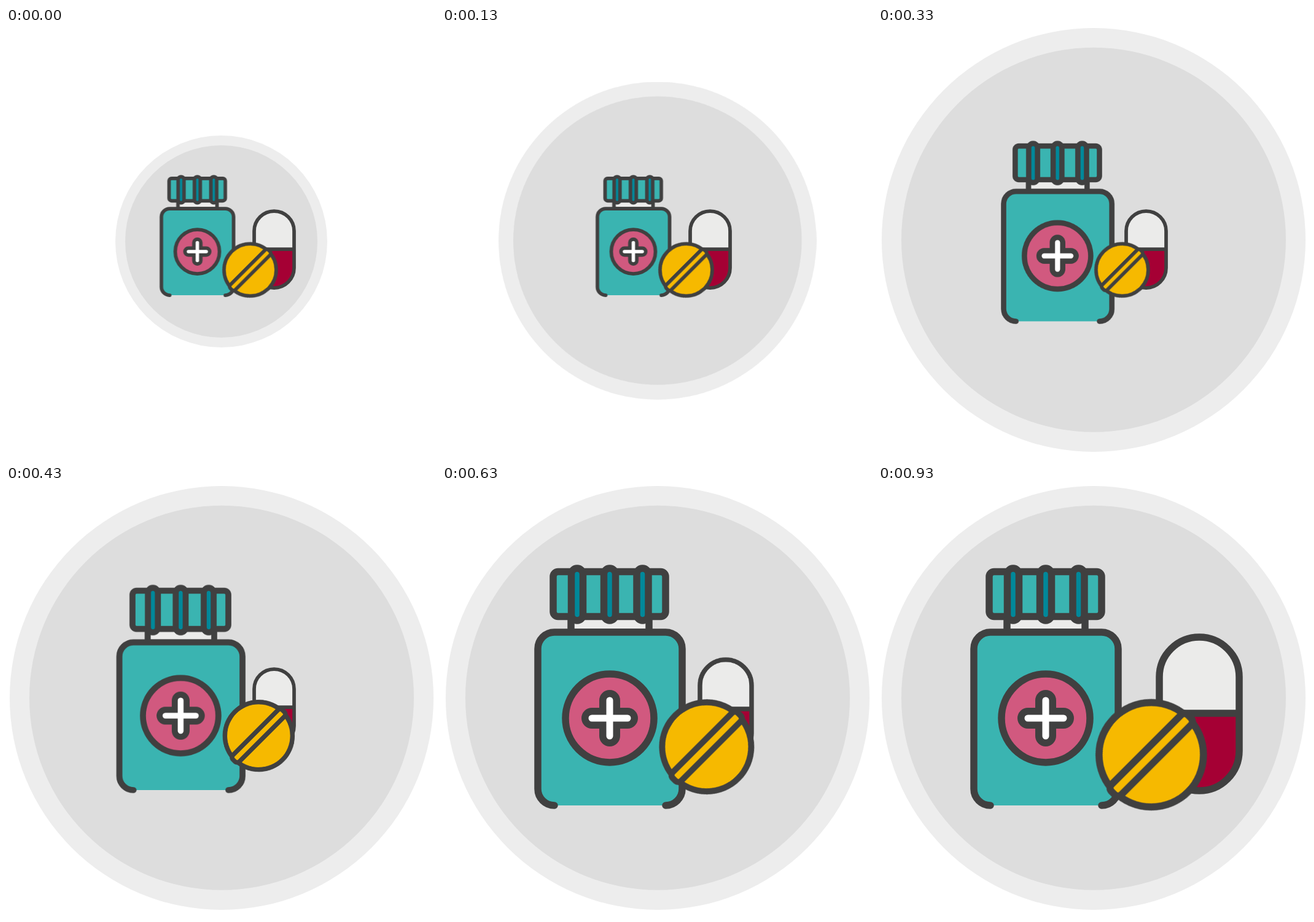
These frames come from a looping animation (700 by 700 pixels, 8000 ms). An HTML page:

```html
<!DOCTYPE html>
<html lang="en">
<head>
<meta charset="utf-8">
<title>Medicine icon</title>
<style>
  html, body { margin: 0; width: 100%; height: 100%; overflow: hidden; background: #fff; }
  svg { display: block; width: 100%; height: 100%; }

  .part { transform-origin: 350px 350px; animation: 8s step-end infinite; }
  .plate { animation-name: plate; }
  .capsule { animation-name: capsule; }
  .bottle { animation-name: bottle; }
  .tablet { animation-name: tablet; }

  /* Each part doubles in four hard steps, one part after another. */
  @keyframes plate {
    0% { transform: scale(.5); }
    .375% { transform: scale(.647); }
    1.625% { transform: scale(.75); }
    2.875% { transform: scale(.853); }
    4.125%, 100% { transform: scale(1); }
  }
  @keyframes bottle {
    0% { transform: scale(.5); }
    2.875% { transform: scale(.647); }
    4.125% { transform: scale(.75); }
    5.375% { transform: scale(.853); }
    6.625%, 100% { transform: scale(1); }
  }
  @keyframes tablet {
    0% { transform: scale(.5); }
    5.375% { transform: scale(.647); }
    6.625% { transform: scale(.75); }
    7.875% { transform: scale(.853); }
    9.125%, 100% { transform: scale(1); }
  }
  @keyframes capsule {
    0% { transform: scale(.5); }
    7.875% { transform: scale(.647); }
    9.125% { transform: scale(.75); }
    10.375% { transform: scale(.853); }
    11.625%, 100% { transform: scale(1); }
  }

  .ink { stroke: #404040; stroke-width: 11.5; }
  .teal { fill: #3ab4b1; }
  .deep { fill: #00889a; }
  .pale { fill: #ebebea; }
  .pink { fill: #d1597f; }
  .gold { fill: #f6b900; }
  .red { fill: #a50034; }
  .none { fill: none; }
  .cross { fill: none; stroke-linecap: round; }
</style>
</head>
<body>
<svg viewBox="0 0 700 700">
  <defs>
    <rect id="rib" x="-9.5" y="134" width="19" height="85" rx="9.5"/>
    <path id="plus" d="M-29 0H29M0 -29V29"/>
  </defs>

  <g class="part plate">
    <circle cx="351" cy="345" r="345" fill="#ededed"/>
    <circle cx="351" cy="344.8" r="313" fill="#ddd"/>
  </g>

  <g class="part capsule">
    <path class="pale" d="M458 370V311A65 65 0 0 1 588 311V370Z"/>
    <path class="red" d="M458 370V431A65 65 0 0 0 588 431V370Z"/>
    <path class="ink" d="M458 370H588"/>
    <rect class="ink none" x="458" y="246" width="130" height="250" rx="65"/>
  </g>

  <g class="part bottle">
    <path class="pale ink" d="M210 213V238H337V213"/>
    <rect class="teal ink" x="181" y="139.5" width="183" height="73" rx="8"/>
    <g class="deep ink">
      <use href="#rib" x="220"/>
      <use href="#rib" x="273"/>
      <use href="#rib" x="326.5"/>
    </g>
    <path class="teal ink" stroke-linecap="round"
      d="M183 520A27 27 0 0 1 156 493V265A27 27 0 0 1 183 238H364A27 27 0 0 1 391 265V493A27 27 0 0 1 364 520"/>
    <circle class="pink ink" cx="273" cy="378" r="72"/>
    <g class="cross" transform="translate(273 378)">
      <use href="#plus" stroke="#404040" stroke-width="34"/>
      <use href="#plus" stroke="#fff" stroke-width="11"/>
    </g>
  </g>

  <g class="part tablet">
    <g class="gold ink" transform="translate(444.8 437.5) rotate(-45)">
      <circle r="85"/>
      <rect x="-88" y="-11.5" width="176" height="23" rx="8"/>
    </g>
  </g>
</svg>
</body>
</html>
```
